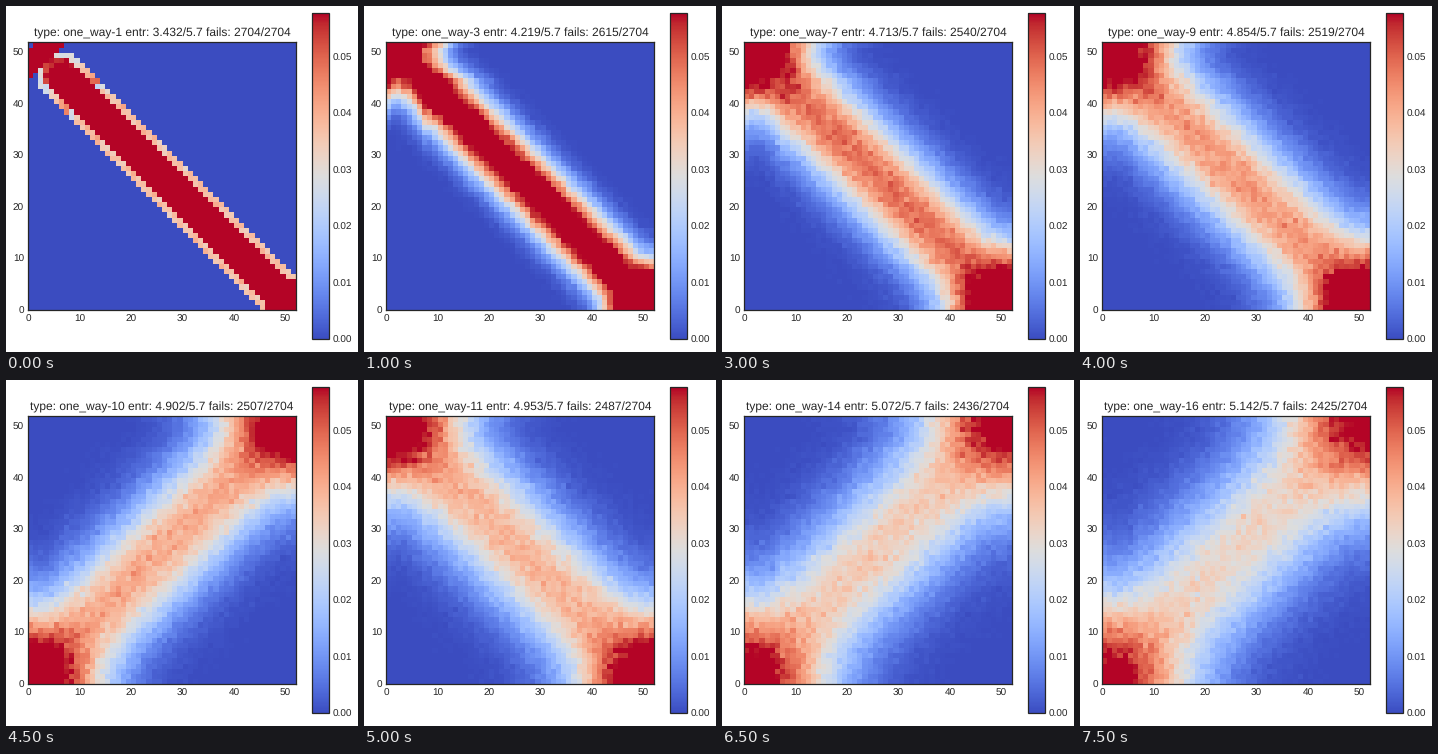
Animation, 352 px wide and 346 px high, one loop 8000 ms. Source, as a matplotlib script:

```python
import numpy as np
import matplotlib.pyplot as plt
from matplotlib.animation import FuncAnimation

W, H, DPI = 352, 346, 72
CARDS, ROUNDS, TRIALS = 52, 16, 10000
PACKETS = range(2, 8)
TOLERANCE = 0.0033
INK = "0.15"


def overhand_matrix():
    """Chance that a card (column) lands on a position (row) in one shuffle."""
    step = np.zeros((CARDS, CARDS))
    cut = np.zeros(CARDS + 1)
    cut[0] = 1
    for start in range(CARDS):
        p = cut[start] / len(PACKETS)
        for n in PACKETS:
            size = min(n, CARDS - start)
            cut[start + size] += p
            for j in range(size):
                step[CARDS - start - size + j, start + j] += p
    return step


def sampled_tables():
    rng = np.random.default_rng(7)
    step = overhand_matrix()
    table = np.eye(CARDS)
    tables = []
    for _ in range(ROUNDS):
        table = step @ table
        tables.append(rng.binomial(TRIALS, np.clip(table, 0, 1)) / TRIALS)
    return tables


def mean_entropy(table):
    logs = np.log2(np.where(table > 0, table, 1))
    return -(table * logs).sum() / CARDS


def count_fails(table):
    return np.count_nonzero(np.abs(table - 1 / CARDS) > TOLERANCE)


def add_axes(left, top, width, height):
    return fig.add_axes([left / W, 1 - (top + height) / H, width / W, height / H])


plt.rcParams.update({
    "font.family": "Liberation Sans",
    "font.size": 10,
    "text.hinting": "none",
    "text.color": INK,
    "axes.edgecolor": INK,
    "axes.linewidth": 1.25,
    "xtick.color": INK,
    "ytick.color": INK,
    "xtick.major.size": 0,
    "ytick.major.size": 0,
    "xtick.major.pad": 4,
    "ytick.major.pad": 4,
})

fig = plt.figure(figsize=(W / DPI, H / DPI), dpi=DPI, facecolor="white")
ax = add_axes(22, 36.4, 267.84, 267.84)
cax = add_axes(305.9, 7.3, 17, 326.16)

tables = sampled_tables()
mesh = ax.pcolormesh(tables[0], cmap="coolwarm", vmin=0, vmax=3 / CARDS)
ax.set_xticks(range(0, 51, 10))
ax.set_yticks(range(0, 51, 10))
title = ax.set_title("", fontsize=12, pad=6)

bar = fig.colorbar(mesh, cax=cax, ticks=np.arange(6) / 100, format="%.2f")
bar.outline.set_edgecolor(INK)
bar.outline.set_linewidth(1.25)


def update(i):
    table = tables[i]
    mesh.set_array(table)
    title.set_text(f"type: one_way-{i + 1} "
                   f"entr: {mean_entropy(table):.3f}/{np.log2(CARDS):.1f} "
                   f"fails: {count_fails(table)}/{table.size}")
    return mesh, title


anim = FuncAnimation(fig, update, frames=ROUNDS, interval=500,
                     repeat=True, repeat_delay=0)
plt.show()
```
